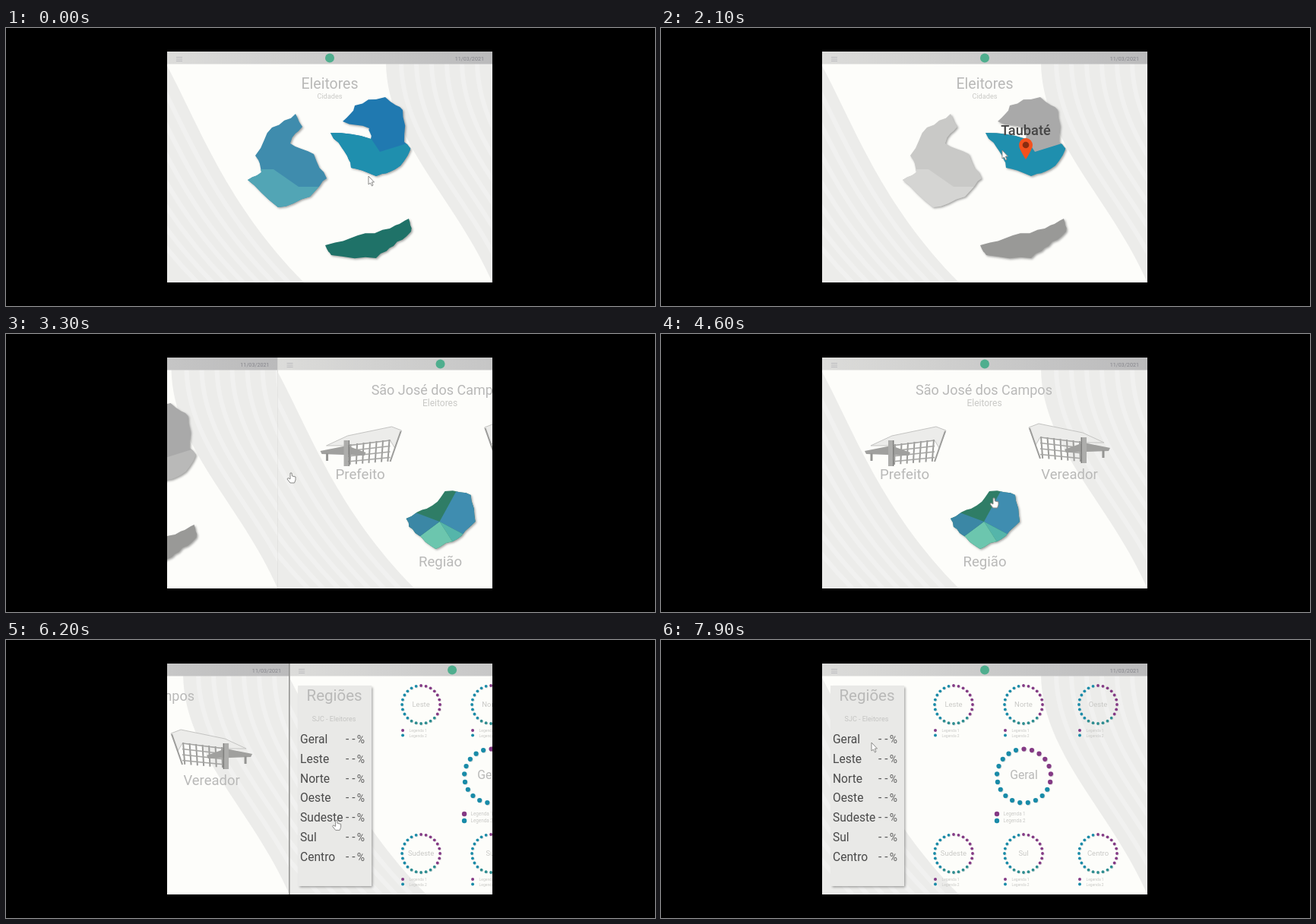
An HTML page with a canvas that plays this animation: 854 by 366 pixels, repeating every 8000 ms.

```html
<!DOCTYPE html>
<html lang="pt">
<head>
<meta charset="utf-8">
<style>
html, body { margin: 0; width: 100%; height: 100%; overflow: hidden; background: #000; }
canvas { display: block; }
</style>
</head>
<body>
<canvas id="stage" width="854" height="366"></canvas>
<script>
const c = document.getElementById('stage').getContext('2d');
const LOOP = 8000, LEFT = 212, TOP = 31, W = 428, H = 304;
const TITLE = '#b9b9b8', FAINT = '#c9c9c6', PURPLE = '#843a85', TEAL = '#198ba8';

// Outlines by key points; rough() adds the ragged coast
const west = rough([381,113, 390,130, 374,152, 405,166, 422,198, 400,222, 358,236, 318,200, 336,190, 328,168, 350,131]);
const east = rough([443,123, 459,102, 499,91, 522,108, 524,150, 532,160, 512,186, 487,195, 454,184, 445,162, 427,138, 480,146, 478,132]);
const coast = rough([420,286, 463,273, 505,264, 530,251, 533,268, 510,287, 487,303, 428,299]);
const region = rough([381,243, 408,230, 432,207, 466,212, 472,247, 448,270, 420,283, 393,262]);
const westLower = [300,186, 352,186, 385,209, 430,209, 430,250, 300,250];
const eastLower = [420,130, 480,145, 492,163, 540,148, 540,205, 420,205];

const labels = {
  west: ['São José dos Campos', 391, 166],
  eastUpper: ['Guaratinguetá', 490, 134],
  eastLower: ['Taubaté', 480, 141]
};
const hovers = [[2350, 'west'], [1800, 'eastLower'], [1200, 'eastUpper'], [200, 'west']];

// Pointer tip: time, x, y
const path = [
  [0,477,195], [300,385,183], [1100,385,183], [1500,500,120], [2100,449,161],
  [2500,374,183], [4100,374,183], [4600,437,216], [4900,545,165], [5100,433,238],
  [6950,434,237], [7900,277,135], [LOOP,277,135]
];

// Adds kinks at edge midpoints, twice
function rough(p, size = 2.2) {
  const out = [];
  for (let i = 0; i < p.length; i += 2) {
    const x = p[i], y = p[i + 1], j = (i + 2) % p.length;
    const mx = (x + p[j]) / 2, my = (y + p[j + 1]) / 2;
    out.push(x, y, mx + size * Math.sin(mx * 7 + my * 3), my + size * Math.cos(mx * 5 + my));
  }
  return size > 2 ? rough(out, 1.3) : out;
}

function poly(p, fill, stroke) {
  c.beginPath();
  for (let i = 0; i < p.length; i += 2) c.lineTo(p[i], p[i + 1]);
  c.closePath();
  if (fill) { c.fillStyle = fill; c.fill(); }
  if (stroke) { c.strokeStyle = stroke; c.stroke(); }
}

function shaded(paint) {
  c.save();
  c.shadowColor = 'rgba(70,70,70,.5)';
  c.shadowBlur = 3;
  c.shadowOffsetX = c.shadowOffsetY = 1.5;
  paint();
  c.restore();
}

// A shadowed outline with further areas painted inside it
function land(outline, fill, inside = () => {}) {
  shaded(() => poly(outline, fill));
  c.save();
  poly(outline);
  c.clip();
  inside();
  c.restore();
}

function dot(x, y, r, fill) {
  c.fillStyle = fill;
  c.beginPath();
  c.arc(x, y, r, 0, 7);
  c.fill();
}

function box(x, y, w, h, fill) {
  c.fillStyle = fill;
  c.fillRect(x, y, w, h);
}

function line(x1, y1, x2, y2, color, width) {
  c.strokeStyle = color;
  c.lineWidth = width;
  c.beginPath();
  c.moveTo(x1, y1);
  c.lineTo(x2, y2);
  c.stroke();
}

function text(s, x, y, size, fill, align = 'center', weight = 400) {
  c.font = `${weight} ${size}px Roboto, sans-serif`;
  c.textAlign = align;
  c.fillStyle = fill;
  c.fillText(s, x, y);
}

// Curved corner with faint streaks along its edge
function swoosh(x, y, curve, cornerX, cornerY, dir) {
  const trace = d => {
    c.beginPath();
    c.moveTo(x + d, y);
    c.bezierCurveTo(...curve.map((v, k) => k % 2 ? v : v + d));
  };
  c.save();
  trace(0);
  c.lineTo(cornerX, cornerY);
  c.closePath();
  c.fillStyle = '#ececea';
  c.fill();
  c.clip();
  c.strokeStyle = 'rgba(255,255,255,.25)';
  c.lineWidth = 6;
  for (let i = 1; i < 8; i++) {
    trace(dir * i * 20);
    c.stroke();
  }
  c.restore();
}

function backdrop() {
  box(LEFT, TOP, W, H, '#fdfdfa');
  swoosh(212, 50, [255,130, 290,232, 392,335], 212, 335, -1);
  swoosh(500, 47, [502,150, 592,225, 640,335], 640, 47, 1);
  const g = c.createLinearGradient(LEFT, 0, LEFT + W, 0);
  g.addColorStop(0, '#dcdcda');
  g.addColorStop(1, '#bababb');
  box(LEFT, TOP, W, 16.5, g);
  for (let y = 38; y < 44; y += 2.5) box(224, y, 8, 1, '#bdbdc0');
  dot(426, 39.5, 6, '#4fae8e');
  text('11/03/2021', 629, 43, 7.2, '#86868c', 'right');
}

function pin(x, y) {
  c.beginPath();
  c.arc(x, y, 9, Math.PI * .9, Math.PI * .1);
  c.quadraticCurveTo(x + 6, y + 10, x, y + 19);
  c.quadraticCurveTo(x - 6, y + 10, x - 8.6, y + 2.8);
  c.fillStyle = '#f4511e';
  c.fill();
  dot(x, y, 4.3, '#8a2c10');
}

function cityPage(t) {
  const hover = (hovers.find(h => t >= h[0]) || [])[1];
  const tint = (name, color, muted) => !hover || hover === name ? color : muted;
  text('Eleitores', 426, 80, 19.5, TITLE);
  text('Cidades', 426, 93, 9.2, FAINT);
  land(west, tint('west', '#3f8cad', '#c9c9c7'), () =>
    poly(westLower, tint('westLower', '#52a5b5', '#d5d5d3')));
  land(east, tint('eastUpper', '#2079b0', '#a9a9a9'), () =>
    poly(eastLower, tint('eastLower', '#1f8fae', '#b9b9b8')));
  land(coast, tint('coast', '#1f7268', '#999997'));
  if (!hover || t > 3150) return;
  const [name, x, y] = labels[hover];
  text(name, x, y, 18.2, '#454545', 'center', 500);
  pin(x, y + 13);
}

function building() {
  c.lineWidth = 1;
  poly([276,147, 304,134, 362,122, 375,127, 366,150, 360,140, 304,147], '#ececea', '#c4c4c2');
  for (let i = 0; i < 7; i++) line(308 + i * 8.5, 145 - i, 307 + i * 8.3, 172 - i * .7, '#9c9c9a', 2);
  for (let i = 0; i < 4; i++) line(304, 147 + i * 7, 360, 140 + i * 7.5, '#a5a5a3', 1.5);
  line(374, 128, 360, 168, '#9c9c9a', 2);
  poly([268,154, 303,147, 328,156, 326,160, 270,158], '#a0a09e');
  line(277, 157, 277, 167, '#949492', 3);
  box(299, 140, 6, 34, '#adadab');
  box(305, 140, 1.5, 34, '#7f7f7d');
}

function officePage() {
  text('São José dos Campos', 425, 80, 18, TITLE);
  text('Eleitores', 425.5, 95, 12, FAINT);
  building();
  c.save();
  c.translate(859, -4);
  c.scale(-1, 1);
  building();
  c.restore();
  text('Prefeito', 320.5, 191, 18.7, TITLE);
  text('Vereador', 537.5, 191, 18.5, TITLE);
  land(region, '#2f7d66', () => {
    let from = -1.07;
    for (const [to, color] of [[.49, '#3f8db0'], [1, '#55b5aa'], [2.5, '#6cc6ae'], [3.5, '#3b87a5']]) {
      c.beginPath();
      c.moveTo(425, 247);
      c.arc(425, 247, 70, from, to);
      c.fillStyle = color;
      c.fill();
      from = to;
    }
  });
  text('Região', 426, 306, 18.6, TITLE);
}

function ring(name, x, y, big) {
  const n = big ? 21 : 24, r = big ? 35.5 : 25, size = big ? 3.1 : 1.9;
  for (let i = 0; i < n; i++) {
    const a = i / n * Math.PI * 2;
    const color = i < n * (big ? .29 : .36) ? PURPLE : big ? TEAL : i < n * .6 ? '#2d8d90' : TEAL;
    const px = x + r * Math.sin(a), py = y - r * Math.cos(a);
    dot(px + .8, py + .8, size, '#dededc');
    dot(px, py, size, color);
  }
  text(name, x, y + (big ? 4 : 3), big ? 15.8 : 9.5, big ? TITLE : FAINT);
  const lx = x - (big ? 35.5 : 24), ly = y + (big ? 50 : 34), step = big ? 9 : 6.5;
  [PURPLE, TEAL].forEach((color, i) => {
    dot(lx, ly + i * step, size + .1, color);
    text('Legenda ' + (i + 1), lx + 8.5, ly + i * step + 2, big ? 6.3 : 5, FAINT, 'left');
  });
}

function regionPage() {
  shaded(() => box(223, 60, 97, 264, '#e9e9e7'));
  text('Regiões', 271, 80, 20.5, TITLE);
  text('SJC - Eleitores', 270.5, 107, 9, '#c4c4c2');
  const names = ['Geral', 'Leste', 'Norte', 'Oeste', 'Sudeste', 'Sul', 'Centro'];
  names.forEach((name, i) => {
    const y = 136 + i * 25.8;
    text(name, 226, y, 15.6, '#4a4a4a', 'left');
    text('- -', 286, y, 15.6, '#5c5c5c', 'left');
    text('%', 311, y, 14, '#5c5c5c', 'right');
    if (i) ring(name, [385, 477, 575][(i - 1) % 3], i < 4 ? 85 : 281);
  });
  ring('Geral', 477.5, 179, true);
}

function pointer(t) {
  const k = path.findIndex(p => p[0] > t);
  const [t0, x0, y0] = path[k - 1], [t1, x1, y1] = path[k];
  const u = (t - t0) / (t1 - t0), e = u * u * (3 - 2 * u);
  c.save();
  c.translate(x0 + (x1 - x0) * e, y0 + (y1 - y0) * e);
  c.lineWidth = 1;
  const hand = t > 2400 && t < 6500;
  poly(hand
    ? [0,0, 2,0, 2.5,4, 7,5, 7,9, 5.5,13, 0,13, -4,8, -3,6.5, 0,8]
    : [0,0, 0,11, 2.5,9, 4.5,13, 6,12, 4.3,8, 7.5,8], '#fff', '#8a8a88');
  c.restore();
}

// Page position (0 to 2), each slide easing out
function scroll(t) {
  const slide = start => 1 - (1 - Math.min(1, Math.max(0, (t - start) / 500))) ** 3;
  return slide(3150) + slide(6062);
}

function draw(now) {
  const t = now % LOOP, pos = scroll(t);
  box(0, 0, 854, 366, '#000');
  c.save();
  c.beginPath();
  c.rect(LEFT, TOP, W, H);
  c.clip();
  [cityPage, officePage, regionPage].forEach((page, i) => {
    const dx = (i - pos) * W;
    if (Math.abs(dx) >= W) return;
    c.save();
    c.translate(dx, 0);
    backdrop();
    page(t);
    if (i === 2 && dx > 0) box(LEFT - 1, TOP, 1.5, H, '#8f8f8d');
    c.restore();
  });
  pointer(t);
  c.restore();
  requestAnimationFrame(draw);
}
requestAnimationFrame(draw);
</script>
</body>
</html>
```
